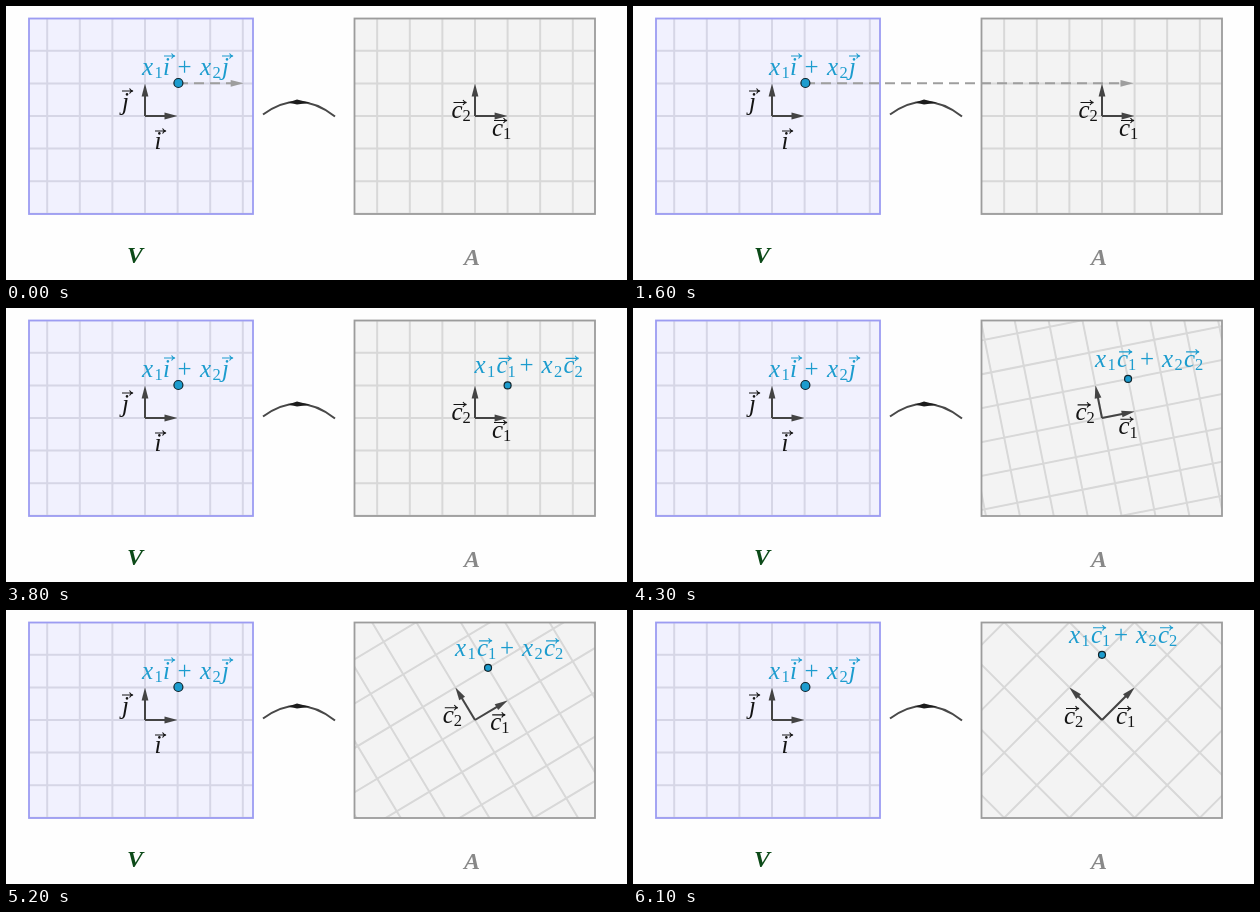
Write an HTML page that moves like this. It is 621x274 px and loops after 6.6 s.

```html
<!DOCTYPE html>
<html lang="en">
<head>
<meta charset="utf-8">
<title>Linear map between two planes</title>
<style>
html, body { margin: 0; width: 100%; height: 100%; overflow: hidden; background: #fefefe; }
svg { display: block; }
text { font: italic 25px "Liberation Serif", serif; }
text.up { font-style: normal; }
text.sub { font: 16.5px "Liberation Serif", serif; }
text.name { font-weight: bold; font-size: 24px; }
.grid path { fill: none; stroke-width: 2; vector-effect: non-scaling-stroke; }
</style>
</head>
<body>
<svg width="621" height="274" viewBox="0 0 621 274">
  <clipPath id="boxV"><rect x="23" y="12.5" width="224" height="195.5"/></clipPath>
  <clipPath id="boxA"><rect x="348.5" y="12.5" width="240.5" height="195.5"/></clipPath>
  <rect x="23" y="12.5" width="224" height="195.5" fill="#f1f1fe"/>
  <rect x="348.5" y="12.5" width="240.5" height="195.5" fill="#f3f3f3"/>
  <g class="grid" clip-path="url(#boxV)" stroke="#d6d6e6"><path id="gridV" transform="translate(139 110)"/></g>
  <g class="grid" clip-path="url(#boxA)" stroke="#d8d8d8"><path id="gridA"/></g>
  <g fill="none" stroke-width="1.8">
    <rect x="23" y="12.5" width="224" height="195.5" stroke="#9c9cf2"/>
    <rect x="348.5" y="12.5" width="240.5" height="195.5" stroke="#9c9c9c"/>
    <path d="M257 108.5Q293 82 329 110.5" stroke="#484848" stroke-width="2"/>
  </g>
  <path d="M282 96.5L291 93.5L304 96.8L291 98.6Z" fill="#1c1c1c"/>
  <text class="name" x="121" y="257" fill="#0c4a18">V</text>
  <text class="name" x="458" y="259" fill="#888">A</text>
  <g id="scene"></g>
</svg>
<script>
const STEPS = [0, 200, 700, 1100, 1600, 2000, 2500, 3000, 3400, 3800, 4300, 4700, 5200, 5700, 6100];
const LOOP = 6600, UNIT = 32.6, BLUE = [28, 156, 206];
const INK = '#141414', DARK = '#444';
const $ = id => document.getElementById(id);
const clamp = v => Math.max(0, Math.min(1, v));

const glyph = (x, y, ch, cls = '') => `<text class="${cls}" x="${x}" y="${y}">${ch}</text>`;
const sub = (x, y, n) => glyph(x, y + 3.5, n, 'sub');
const vec = (x, y, w = 11) =>
  `<path d="M${x} ${y}h${w}m-3.5 -2.6q1 2 3.5 2.6q-2.5 .6 -3.5 2.6" fill="none" stroke="currentColor" stroke-width="1.1"/>`;
const paint = (color, body) => `<g fill="${color}" color="${color}">${body}</g>`;
const dot = (x, y, r, color) =>
  `<circle cx="${x}" cy="${y}" r="${r}" fill="${color}" stroke="#10242c" stroke-width="1.2"/>`;

// straight arrow with a filled head
function arrow(x1, y1, x2, y2, color, dash = 'none') {
  const len = Math.hypot(x2 - x1, y2 - y1);
  const turn = Math.atan2(y2 - y1, x2 - x1) * 180 / Math.PI;
  return `<g transform="translate(${x1} ${y1}) rotate(${turn})">
    <path d="M0 0H${len - 10}" stroke="${color}" stroke-width="2" stroke-dasharray="${dash}"/>
    <path d="M${len} 0l-13 -3.4v6.8z" fill="${color}"/></g>`;
}

// c with a vector arrow and an index
const cVec = (x, y, n) => glyph(x, y, 'c') + sub(x + 11, y, n) + vec(x + 2, y - 15, 13);
const xSub = (x, y, n) => glyph(x, y, 'x') + sub(x + 12.5, y, n);

const sumV = (x, y) => xSub(x, y, 1) + glyph(x + 21, y, 'i') + vec(x + 22, y - 18.5) +
  glyph(x + 35.5, y, '+', 'up') + xSub(x + 58, y, 2) + glyph(x + 80, y, 'j') + vec(x + 80, y - 18.5);
const sumA = (x, y) => xSub(x, y, 1) + cVec(x + 22, y, 1) +
  glyph(x + 45, y, '+', 'up') + xSub(x + 67, y, 2) + cVec(x + 89, y, 2);

function draw(n) {
  const k = clamp((n - 9) / 5);          // shear-rotation amount
  const shade = clamp((n - 4) / 5);      // black to blue
  const tip = 172 + 328.5 * clamp((n + 1) / 5);
  const tail = 172 + 328.5 * shade;
  const blue = `rgb(${BLUE})`;
  const tint = `rgb(${BLUE.map(c => Math.round(c * shade))})`;
  const ox = 469, oy = 110, u = UNIT;
  const px = ox + u * (1 - k), py = oy - u * (1 + k);

  $('gridA').setAttribute('transform', `matrix(1 ${-k} ${k} 1 ${ox} ${oy})`);
  let out = '';
  if (n < 9) out += arrow(tail, 77.3, tip, 77.3, '#9e9e9e', '10 6');
  out += arrow(139, 110, 171.5, 110, DARK) + arrow(139, 110, 139, 77.5, DARK);
  out += arrow(ox, oy, ox + u, oy - u * k, DARK) + arrow(ox, oy, ox - u * k, oy - u, DARK);
  out += paint(INK,
    glyph(148.5, 142.5, 'i') + vec(149, 125) + glyph(116, 104, 'j') + vec(116, 85) +
    cVec(486 - 3 * k, 129.5 - 16 * k, 1) + cVec(445.5 - 14.5 * k, 111.5 + 2 * k, 2));
  out += dot(172.4, 77, 4.5, blue) + paint(blue, sumV(136, 68.5));
  if (n > 4) out += dot(px, py, 3.5, tint) + paint(tint, sumA(px - 33, py - 12));
  $('scene').innerHTML = out;
}

let lines = '';
for (let i = -12; i <= 12; i++) lines += `M${i * UNIT} -500V500M-500 ${i * UNIT}H500`;
$('gridV').setAttribute('d', lines);
$('gridA').setAttribute('d', lines);

let shown = -1;
function tick() {
  const t = performance.now() % LOOP;
  const n = STEPS.filter(s => s <= t).length - 1;
  if (n !== shown) draw(shown = n);
  requestAnimationFrame(tick);
}
tick();
</script>
</body>
</html>
```
